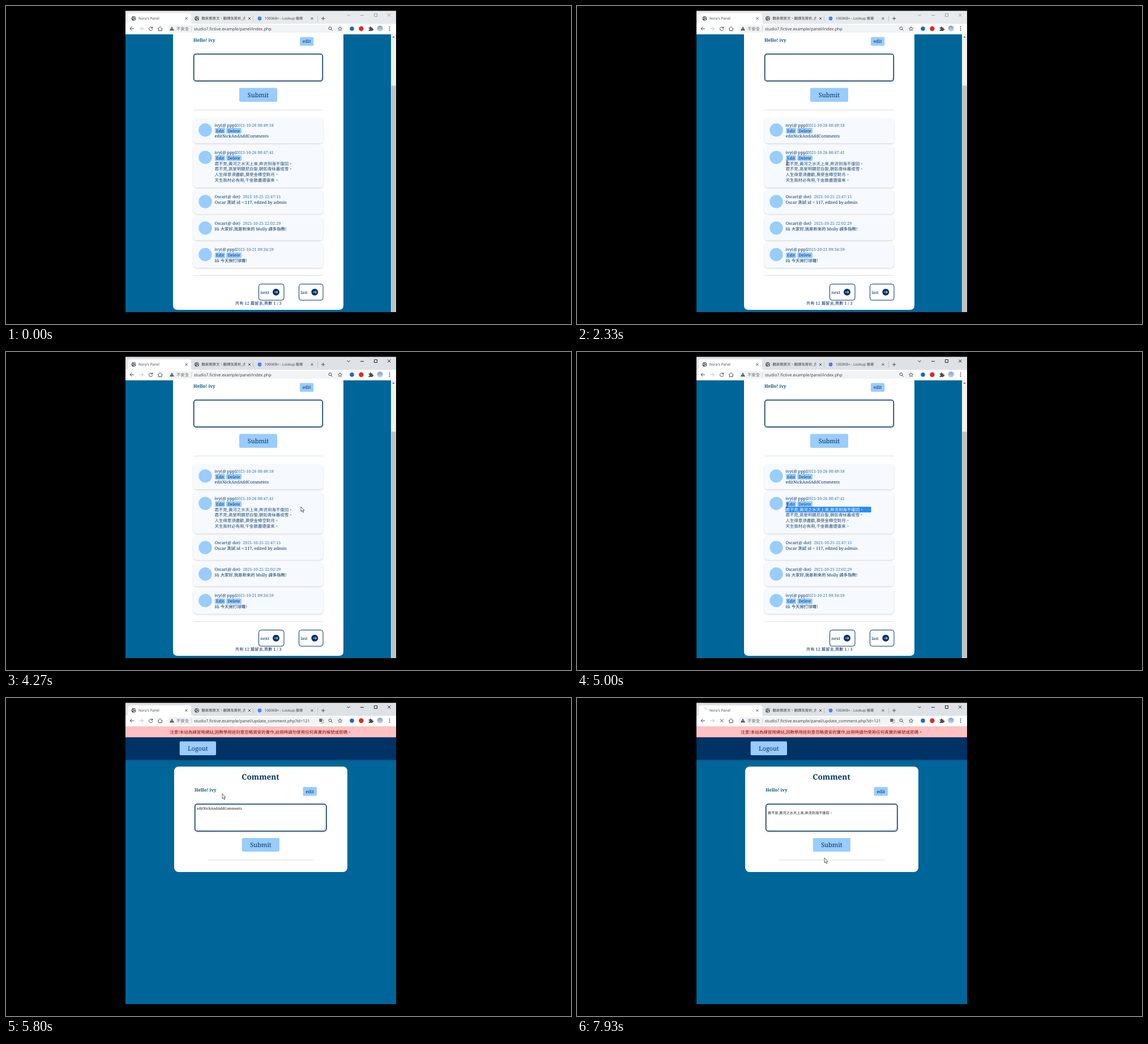
These frames come from a looping animation (998x561 px, 8 s). An HTML page:

```html
<!DOCTYPE html>
<html lang="zh-Hant">
<head>
<meta charset="utf-8">
<title>Message board demo</title>
<style>
html, body { margin: 0; width: 100%; height: 100%; overflow: hidden; background: #000; }
svg { display: block; width: 100%; height: 100%; }
text { text-rendering: geometricPrecision; white-space: pre; }
.ui { font: 6.35px "Open Sans", "Noto Sans CJK TC", sans-serif; fill: #3c4043; }
.url { font-size: 7.32px; }
.slab { font: 500 7.4px "Roboto Slab", "Noto Serif", "Noto Sans CJK TC", serif; fill: #036; }
.cjk { font: 7.45px "Noto Sans CJK TC", "Noto Sans CJK SC", sans-serif; fill: #1d4a74; }
.mid { text-anchor: middle; }
.bold { font-weight: 700; }
.line { fill: none; stroke: #4a4d51; stroke-width: 1; }
</style>
</head>
<body>
<svg id="stage" viewBox="0 0 998 561" xmlns="http://www.w3.org/2000/svg"></svg>
<script>
const LOOP = 8000, STEP = 200 / 3, CHAR = 7.45;
const HOST = "studio7.fictive.example/panel/";
const POEM = [
  "君不見,黃河之水天上來,奔流到海不復回。",
  "君不見,高堂明鏡悲白髮,朝如青絲暮成雪。",
  "人生得意須盡歡,莫使金樽空對月。",
  "天生我材必有用,千金散盡還復來。"
].map(s => s.replace(/,/g, ","));
const DRAFT = "editNickAndAddComments";

const rect = (x, y, x2, y2, fill, r = 0, more = "") =>
  `<rect x="${x}" y="${y}" width="${x2 - x}" height="${y2 - y}" rx="${r}" fill="${fill}" ${more}/>`;
const text = (x, y, s, cls, more = "") => `<text x="${x}" y="${y}" class="${cls}" ${more}>${s}</text>`;
const circle = (x, y, r, fill, more = "") => `<circle cx="${x}" cy="${y}" r="${r}" fill="${fill}" ${more}/>`;
const path = (d, more = "") => `<path class="line" d="${d}" ${more}/>`;
const group = (id, s, more = "") => `<g id="${id}" ${more}>${s}</g>`;
const button = (x, y, x2, y2, s, size, base) =>
  rect(x, y, x2, y2, "#9cf", 2) + text((x + x2) / 2, base, s, "slab mid", `style="font-size:${size}px"`);
const rule = (x, x2, y) => rect(x, y, x2, y + 1, "#dcdfe2");
const field = (x, y, x2, y2) =>
  rect(x + .75, y + .75, x2 - .75, y2 - .75, "#fff", 4, 'stroke="#036" stroke-width="1.5" filter="url(#soft)"') +
  `<path d="M${x2 - 6} ${y2 - 2.5}l4-4m-1.6 4l1.6-1.6" stroke="#888" stroke-width=".6"/>`;

// A line of highlighted text; its clip rectangle is moved by select().
const selLine = (id, x, base, top, h, s, cls, size) => `
  <clipPath id="${id}Clip"><rect id="${id}A" x="${x}" y="${top}" width="0" height="${h}"/></clipPath>
  <rect id="${id}B" x="${x}" y="${top}" width="0" height="${h}" fill="#2c8cf8"/>
  <g clip-path="url(#${id}Clip)">${text(x, base, s, cls, `style="fill:#fff;font-size:${size}px"`)}</g>`;

const globe = (x, y) => circle(x, y, 4, "#5f6368") +
  `<path d="M${x - 3} ${y - 1}q2 0 2.5 1.3t2 1.2-1.5 1.6M${x + .3} ${y - 3}q-.3 1.6 1.2 1.6t1.6 1.2" fill="none" stroke="#fff" stroke-width="1"/>`;
const cross = (x, y, r, more) => path(`M${x - r} ${y - r}l${2 * r} ${2 * r}m0 ${-2 * r}l${-2 * r} ${2 * r}`, more);

function browser() {
  return rect(211, 8.5, 689, 33, "#dee1e6", 0, 'id="bar"') +
    `<path d="M211 32q4 0 4-4V17q0-4 4-4H323q4 0 4 4v11q0 4 4 4z" fill="#fff"/>` +
    rect(211, 31.5, 689, 50, "#fff") +
    group("tabIcon", globe(225.5, 22)) +
    group("spinner", `<path d="M-3.8 0A3.8 3.8 0 0 1 0-3.8" fill="none" stroke="#b9bdc2" stroke-width="1"/>`) +
    text(234, 24.4, "", "ui", 'id="tabTitle" clip-path="url(#tab1)"') + cross(318.5, 22, 2) +
    globe(337, 22) + text(345.5, 24.4, "聽泉歌原文、翻譯及賞析_古", "ui", 'clip-path="url(#tab2)"') + cross(430, 22, 2) +
    rect(436.5, 17, 437, 27, "#9aa0a6") +
    circle(448, 22, 3.4, "#4285f4") + text(456.5, 24.4, "1000KB= - Lookup 搜尋", "ui") + cross(540.5, 22, 2) +
    rect(550, 17, 550.5, 27, "#9aa0a6") + path("M557 22h6.4m-3.2-3.2v6.4") +
    group("controls", path("M602.5 15l2.5 2.5 2.5-2.5M626 16.5h6M650.5 13.5h5v5h-5z", 'style="stroke:inherit"') +
      cross(676.7, 16, 2.6, 'style="stroke:inherit"')) +
    path("M226 40h-7m3.2-3.2L219 40l3.2 3.2") + path("M235.5 40h7m-3.2-3.2l3.2 3.2-3.2 3.2", 'style="stroke:#babdc1"') +
    group("reload", path("M258.3 38.4A3.2 3.2 0 1 0 258.8 41") + `<path d="M259.3 36v3.4h-3.4z" fill="#4a4d51"/>`) +
    group("stop", cross(255.6, 40, 2.8)) +
    path("M268 40.3l4.2-3.8 4.2 3.8M269.3 39.6v4h5.8v-4") +
    rect(285, 33.5, 597, 47, "#f1f3f4", 6.7) +
    `<path d="M293 36.3l4 7h-8z" fill="#4a4d51"/><path d="M293 38.8v2.2m0 .7v.8" stroke="#fff" stroke-width=".8"/>` +
    text(301, 42.7, "不安全", "ui url", 'style="fill:#5f6368"') + rect(327, 36, 327.5, 45, "#b4b8bc") +
    text(332, 42.6, "", "ui url", 'id="address"') +
    group("translate", rect(553.3, 36.5, 558.4, 42, "#5f6368", .6) + path("M557 38.5h3.8v5.4h-4.5M554.5 38.4h2.6m-1.3 0v2.2", 'style="stroke-width:.7;stroke:#7b8086"')) +
    circle(572.5, 39.3, 2.4, "none", 'stroke="#4a4d51"') + path("M574.2 41l2.4 2.5") +
    path("M590 36.6l1 2.4 2.6.2-2 1.7.6 2.5-2.2-1.4-2.2 1.4.6-2.5-2-1.7 2.6-.2z", 'style="stroke-width:.8"') +
    circle(611, 40, 3.8, "#1769c9") + circle(627.4, 40, 4.2, "#e02a22") +
    `<path d="M640.5 38h2.2a1.3 1.3 0 1 1 2.4 0h2.2v2.2a1.3 1.3 0 1 1 0 2.2v1.6h-6.8v-2a1.2 1.2 0 1 0 0-2.2z" fill="#4a4d51"/>` +
    circle(660.6, 39.6, 5.2, "url(#photo)") +
    [37, 40, 43].map(y => circle(677.5, y, .9, "#4a4d51")).join("");
}

function card(top, bottom, mid, name, date, dateX, lines, own) {
  const y = mid + 2.5, first = y + (own ? 19.7 : 10);
  return rect(331, top, 560, bottom, "#f6faff", 6, 'filter="url(#soft)"') +
    circle(352, mid + 8.8, 11.7, "#9cf") +
    text(368.5, y, name, "slab") + text(dateX, y, date, "slab", 'style="fill:#2f6ca3;font-size:7.2px"') +
    (own ? button(369, mid + 5, 387, mid + 15, "Edit", 7.3, y + 10) + button(389, mid + 5, 416, mid + 15, "Delete", 7.3, y + 10) : "") +
    lines.map((s, i) => text(368.5, first + i * 9.85, s, lines.length > 1 ? "cjk" : "slab")).join("");
}

function pager(x, x2, s, iconX) {
  return rect(x, 490.5, x2, 519, "#fff", 4, 'stroke="#036"') + text(x + 2.7, 507.6, s, "slab", 'style="font-size:7.5px"') +
    circle(iconX, 504.8, 6, "#036") +
    path(`M${iconX - 3} 504.8h6m-2.3-2.3l2.3 2.3-2.3 2.3`, 'style="stroke:#fff;stroke-width:.9"');
}

function listPage() {
  const own = "ivy(@ ppp)", other = "Oscar(@ dot)";
  return rect(211, 50, 680, 540, "#069") +
    `<path d="M295 50H596V528q0 8-8 8H303q-8 0-8-8z" fill="#fff"/>` +
    text(331, 62.5, "Hello! ivy", "slab bold", 'style="font-size:7.9px;fill:#005083"') +
    button(519, 54.8, 543.3, 70.3, "edit", 8.1, 65.3) +
    field(331, 84, 560, 133) + button(412, 144.5, 479, 169, "Submit", 11, 161) + rule(331, 560, 183) +
    card(197.5, 242, 210, own, "2021-10-26 00:49:18", 406, [DRAFT], true) +
    card(246, 320, 258.3, own, "2021-10-26 00:47:41", 406, POEM, true) +
    card(324, 366.5, 336.2, other, "2021-10-25 22:47:15", 418.5, ["Oscar 測試 id = 117, edited by admin"]) +
    card(370.5, 413, 383, other, "2021-10-25 22:02:29", 418.5, ["Hi 大家好,我是新來的 Molly 請多指教!"]) +
    card(417, 461.5, 429.7, own, "2021-10-21 09:34:59", 406, ["Hi 今天揪打球囉!"], true) +
    selLine("selA", 368.5, 280.5, 273, 10, POEM[0], "cjk", CHAR) +
    selLine("selB", 368.5, 290.35, 283, 9.8, POEM[1], "cjk", CHAR) +
    rule(331, 560, 475) + pager(446.5, 491, "next", 477) + pager(517.5, 560, "last", 545.3) +
    text(445.7, 527.2, "共有 12 篇留言,頁數 1 / 3", "slab mid") +
    rect(680, 50, 689, 540, "#f1f1f1") + rect(680.5, 140.5, 688.5, 540, "#c1c1c1") +
    `<path d="M682.3 55.8h4.4l-2.2-2.4z" fill="#505050"/>`;
}

function editPage() {
  return rect(211, 50, 689, 540, "#069") +
    rect(211, 69, 689, 109, "#036", 0, 'filter="url(#soft)"') + rect(211, 50, 689, 69.3, "#ffc1c1") +
    text(450, 62.5, "注意!本站為練習用網站,因教學用途刻意忽略資安的實作,註冊時請勿使用任何真實的帳號或密碼。",
      "cjk mid", 'style="fill:#8b0000;font-size:7.5px;font-weight:500"') +
    button(306.7, 76.5, 371, 101, "Logout", 10.8, 93) +
    rect(297, 121, 603, 307, "#fff", 8) +
    text(449.6, 143.6, "Comment", "slab bold mid", 'style="font-size:13.6px"') +
    text(333, 164.7, "Hello! ivy", "slab bold", 'style="font-size:7.9px;fill:#005083"') +
    button(524.5, 157, 549, 172.5, "edit", 8.1, 167.6) +
    field(333, 186.5, 566.5, 235.5) +
    text(337, 196.8, DRAFT, "slab", 'id="draft" style="font-size:6.18px;fill:#111"') +
    text(337, 204.9, POEM[0], "cjk", 'id="pasted" style="font-size:6.2px;fill:#222"') +
    selLine("selC", 337, 196.8, 190.5, 8.5, DRAFT, "slab", 6.18) +
    button(416.8, 247, 483, 271, "Submit", 11, 263.4) + rule(356, 543.5, 285.3);
}

document.getElementById("stage").innerHTML = `
  <defs>
    <filter id="soft" x="-10%" y="-20%" width="120%" height="150%"><feDropShadow dx="0" dy="1.5" stdDeviation="1.8" flood-color="#000" flood-opacity=".16"/></filter>
    <linearGradient id="photo" x2="0" y2="1"><stop stop-color="#7f9fd0"/><stop offset="1" stop-color="#c9d4e4"/></linearGradient>
    <clipPath id="tab1"><rect x="230" y="12" width="81.5" height="20"/></clipPath>
    <clipPath id="tab2"><rect x="340" y="12" width="82.5" height="20"/></clipPath>
  </defs>
  <rect width="998" height="561"/>` +
  group("list", listPage()) + group("edit", editPage()) + browser() +
  group("arrow", `<path d="M0 0V8.7L2 6.9 3.4 10.1 4.9 9.4 3.5 6.3H6.1Z" fill="#fff" stroke="#222" stroke-width=".7"/>`) +
  group("beam", `<path d="M-1.7-4H-.5L0-3.5.5-4H1.7M0-3.5V3.5M-1.7 4H-.5L0 3.5.5 4H1.7" fill="none" stroke="#222" stroke-width=".8"/>`);

const $ = id => document.getElementById(id);
const show = (id, on) => $(id).setAttribute("display", on ? "inline" : "none");
const setText = (id, s) => { if ($(id).textContent !== s) $(id).textContent = s; };

// Pointer path: time, x, y and the shape used from that time on.
const KEYS = [
  [0, 313, 477, ""], [65, 313, 477, "arrow"], [860, 373, 272, "arrow"], [1000, 371, 276, "beam"],
  [1730, 372, 277, "beam"], [2000, 369, 285, "beam"], [2330, 371, 277, "beam"], [2730, 370, 278, "beam"],
  [3130, 480, 280, "beam"], [3270, 512, 284, "beam"], [3400, 508, 287.5, "beam"], [3600, 507, 292, "beam"],
  [3860, 519, 284, "arrow"], [4270, 521, 273, "arrow"], [4460, 519, 277, "beam"], [4930, 370, 277, "beam"],
  [5060, 372, 265, "arrow"], [5270, 377, 219, "arrow"], [5530, 378, 218, "arrow"], [5700, 380, 197, "beam"],
  [5733, 380, 192.7, "beam"], [5795, 382, 169, "arrow"], [6200, 382, 169, "arrow"], [6330, 400, 186, "beam"],
  [6530, 420, 195, "beam"], [6930, 250, 197, "arrow"], [6995, 250, 197, ""], [7465, 400, 232, "arrow"],
  [7700, 440, 262, "arrow"], [7930, 437, 282, "arrow"], [LOOP, 437, 282, "arrow"]
];

function pointer(t) {
  let i = 0;
  while (i < KEYS.length - 2 && KEYS[i + 1][0] <= t) i++;
  const [t0, x0, y0, kind] = KEYS[i], [t1, x1, y1] = KEYS[i + 1];
  const u = (t - t0) / (t1 - t0), e = u * u * (3 - 2 * u);
  return { x: x0 + (x1 - x0) * e, y: y0 + (y1 - y0) * e, kind };
}

function select(id, from, to) {
  for (const part of ["A", "B"]) {
    $(id + part).setAttribute("x", from);
    $(id + part).setAttribute("width", Math.max(0, to - from));
  }
}

function draw(time) {
  const t = Math.floor((time % LOOP + 4) / STEP) * STEP;
  const within = (a, b) => t >= a - 5 && t < b - 5;
  const p = pointer(t);
  const left = 368.5, right = 519.5;
  const snap = x => left + Math.max(0, Math.min(20, Math.round((x - left) / CHAR))) * CHAR;

  for (const kind of ["arrow", "beam"]) {
    show(kind, p.kind === kind);
    $(kind).setAttribute("transform", `translate(${p.x} ${p.y})`);
  }

  const focused = t >= 2725;
  $("bar").setAttribute("fill", focused ? "#dee1e6" : "#e7eaed");
  $("controls").setAttribute("stroke", focused ? "#222" : "#9a9da1");

  const editing = t >= 5795, opening = within(5470, 5800), loading = opening || t >= 7725;
  show("list", !editing);
  show("edit", editing);
  show("translate", editing);
  show("tabIcon", !loading);
  show("spinner", loading);
  show("reload", !loading);
  show("stop", loading);
  $("spinner").setAttribute("transform", `translate(225.7 21.7) rotate(${(t - 5733) * .36})`);
  setText("tabTitle", opening ? HOST + "update" : "Nora's Panel");
  setText("address", HOST + (t >= 5465 ? "update_comment.php?id=121" : "index.php"));

  const dragging = within(2730, 3670), below = dragging && p.y > 283;
  if (dragging) select("selA", left, below ? right : snap(p.x));
  else if (t >= 4465) select("selA", t < 4925 ? snap(p.x) : left, right);
  else select("selA", left, left);
  select("selB", left, below ? snap(p.x + 2) : left);

  const marked = within(6530, 7070);
  select("selC", marked ? Math.max(337, Math.min(418.5, p.x)) : 337, marked ? 418.5 : 337);
  show("draft", t < 7065);
  show("pasted", t >= 7195);
}

function tick() {
  draw(performance.now());
  requestAnimationFrame(tick);
}
tick();
</script>
</body>
</html>
```
